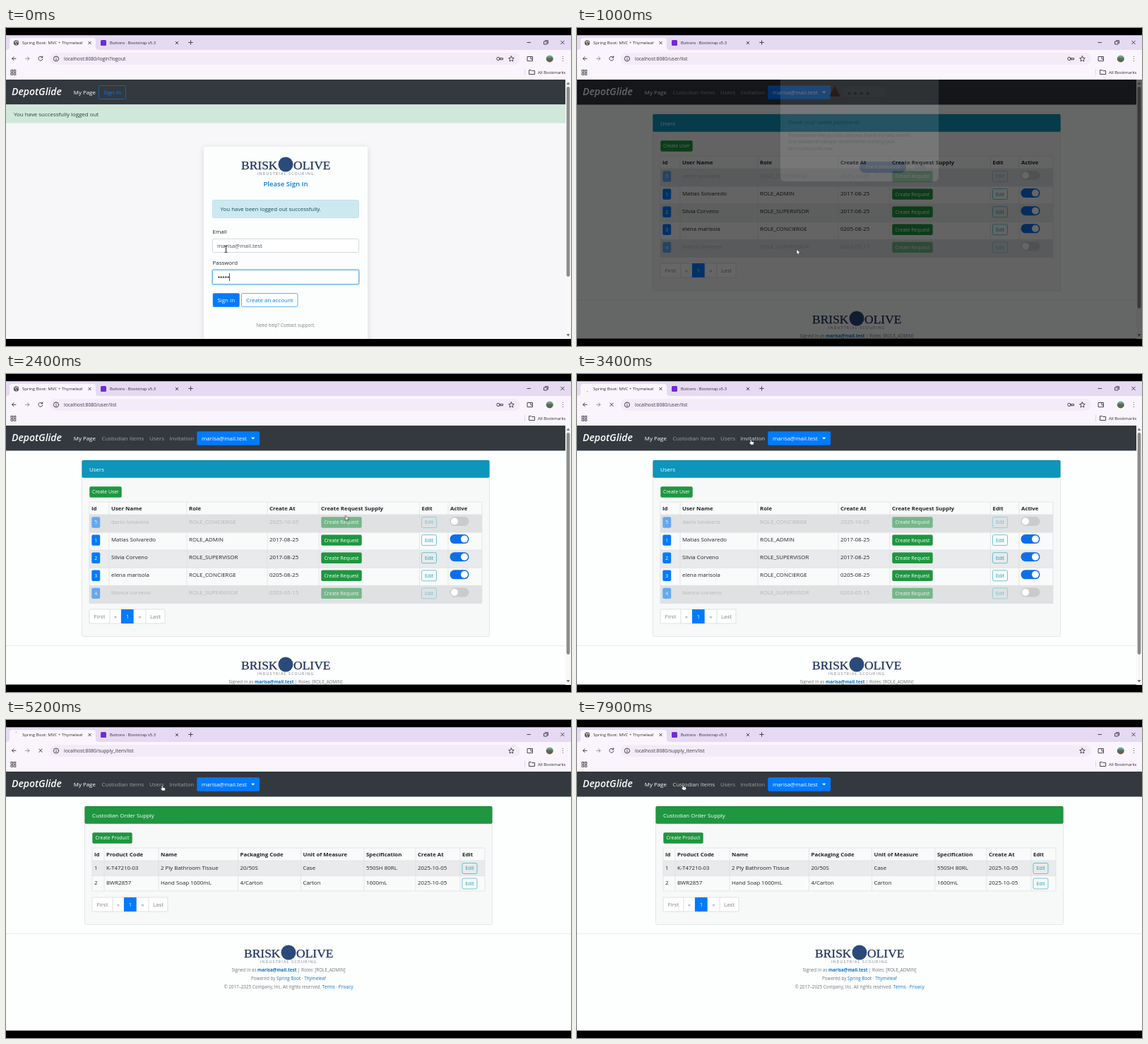
Recreate the animation shown at these times as an HTML page. Size 800 by 450 pixels, loop 8 s.

```html
<!DOCTYPE html>
<html lang="en">
<head>
<meta charset="utf-8">
<title>Supply admin walkthrough</title>
<style>
html, body { margin: 0; width: 100%; height: 100%; overflow: hidden; background: #000; }
svg { display: block; width: 800px; height: 450px; font-family: "Open Sans", "Noto Sans", sans-serif; }
text { white-space: pre; }
.logo { font-family: "Liberation Serif", serif; }
.line { fill: none; stroke: #47434c; stroke-width: 1; stroke-linecap: round; stroke-linejoin: round; }
#wheel { transform-origin: 14.5px 21px; animation: turn .4s linear infinite; }
@keyframes turn { to { transform: rotate(360deg); } }
</style>
</head>
<body>
<svg id="stage" viewBox="0 0 800 450"></svg>
<script>
const LOOP = 8000;
const BLUE = '#007bff', GREEN = '#1f9640', TEAL = '#17a2b8', INK = '#212529', MUTED = '#b4b7ba';
const MAIL = 'marisa@mail.test', OWNER = 'Matias Solvaredo';

// Drawing helpers
const rect = (x, y, w, h, fill, extra = '') =>
  `<rect x="${x}" y="${y}" width="${w}" height="${h}" fill="${fill}" ${extra}/>`;
const text = (x, y, s, size = 7.9, fill = INK, extra = '') =>
  `<text x="${x}" y="${y}" font-size="${size}" fill="${fill}" ${extra}>${s}</text>`;
const middle = (x, y, s, size, fill, extra = '') =>
  text(x, y, s, size, fill, `text-anchor="middle" ${extra}`);
const path = (d, extra = '') => `<path d="${d}" class="line" ${extra}/>`;
const group = (id, ...parts) => `<g id="${id}">${parts.join('')}</g>`;
const cross = (x, y, r) => path(`M${x - r} ${y - r}l${2 * r} ${2 * r}m0 ${-2 * r}l${-2 * r} ${2 * r}`);

const button = (x, y, w, h, label, bg, size = 6.9, fg = '#fff') =>
  rect(x + .3, y + .3, w - .6, h - .6, bg, 'rx="2"') + middle(x + w / 2, y + h / 2 + size * .36, label, size, fg);
const outline = (x, y, w, h, label, color, size = 6.9) =>
  rect(x + .5, y + .5, w - 1, h - 1, 'none', `rx="2" stroke="${color}" stroke-width=".6"`) +
  middle(x + w / 2, y + h / 2 + size * .36, label, size, color);
const fade = (active, s) => active ? s : `<g opacity=".55">${s}</g>`;

// Browser window
function browser() {
  const globe = '<circle cx="14.5" cy="21" r="3.7" fill="#55585c"/>' +
    '<path d="M12 19l2 .4-.5 1.8 1.3 1.2-.6 1.8M15.5 17.8l-.3 1.6 2.2 1" fill="none" stroke="#f4eefa" stroke-width=".9"/>';
  const apps = [0, 4.2].map(dx => [0, 4.2].map(dy =>
    rect(7 + dx, 59.5 + dy, 2.6, 2.6, 'none', 'stroke="#47434c" stroke-width=".9"')).join('')).join('');
  return rect(0, 10, 800, 430, '#fdfefe') +
    rect(0, 10, 800, 22, '#e5daf2') + rect(0, 31, 800, 42, '#faf5fd') +
    '<path d="M1 31q4 0 4-4v-9q0-4 4-4h114q4 0 4 4v9q0 4 4 4z" fill="#faf5fd"/>' +
    group('globe', globe) +
    group('loading', '<path id="wheel" d="M13.8 17.4a3.7 3.7 0 0 1 1.2-.1" fill="none" stroke="#6a6f78"/>') +
    `<g clip-path="url(#tabClip)">${text(23, 23.3, 'Spring Boot: MVC + Thymeleaf', 6.1, '#2b2930')}</g>` +
    cross(118.5, 21, 1.8) +
    rect(134, 17, 8, 8, '#6f2cd6', 'rx="1.5"') +
    text(147, 23.3, 'Buttons · Bootstrap v5.3', 5.8, '#2b2930') + cross(242, 21, 1.8) +
    path('M258.7 20.5h5.6m-2.8-2.8v5.6M738 20.5h4.5M762 19h4v4h-4zM763.5 17.7h4v4') + cross(788, 20.5, 2.3) +
    path('M14 43.3H8.5m2.6-2.6l-2.6 2.6 2.6 2.6') +
    path('M27.5 43.3H33m-2.6-2.6l2.6 2.6-2.6 2.6', 'opacity=".55"') +
    group('reload', path('M51.4 41.5a3 3 0 1 0 .4 2.6M51.8 39.8v2.2h-2.2')) + group('stop', cross(49, 43.3, 2.3)) +
    rect(62, 35, 666, 17, '#f3ecf8', 'rx="8.5"') +
    '<circle cx="71" cy="43.5" r="3.6" class="line"/>' + path('M71 43.3v2M71 41.6v.1') +
    group('key', '<circle cx="697" cy="43.5" r="2.2" class="line"/>', path('M699.2 42.7h4.4v2h-4.2')) +
    path('M715.5 39.8l1.1 2.5 2.7.3-2 1.8.6 2.7-2.4-1.4-2.4 1.4.6-2.7-2-1.8 2.7-.3z') +
    path('M738.5 40.5h7v6.2h-7zM743 41v3h2.5') +
    '<circle cx="769.8" cy="43.5" r="5" fill="url(#avatar)"/>' +
    path('M788.5 40.3v.1m0 3v.1m0 3v.1', 'stroke-width="1.6"') +
    apps + path('M741 59.5h2.6l1 1h4v5H741z') + rect(734, 58, .8, 9, '#d9cfe3') +
    text(753, 64.9, 'All Bookmarks', 5.9, '#2b2930');
}

const url = s => text(82, 46, 'localhost:8080/' + s, 6.85, '#3a373e');

const scrollbar = end => rect(792, 73, 8, 367, '#f8f8f8') + rect(793.6, 83, 4.8, end - 83, '#8c8c8c', 'rx="2.4"') +
  '<path d="M793.5 80l2.5-3.5 2.5 3.5zM793.5 433l2.5 3.5 2.5-3.5z" fill="#777"/>';

function logo(cx, cy) {
  const word = (x, s, anchor) => text(x, cy + 7, s, 17.5, '#1c3058', `class="logo" text-anchor="${anchor}" stroke="#1c3058" stroke-width=".25"`);
  return word(cx - 11.5, 'BRISK', 'end') + `<circle cx="${cx}" cy="${cy}" r="10.5" fill="#2a4a7c"/>` +
    word(cx + 11, 'OLIVE', 'start') +
    middle(cx, cy + 15.3, 'INDUSTRIAL SCOURING', 5.4, '#777c86', 'letter-spacing="1.15"');
}

function footer(cx, y) {
  const link = s => `<tspan fill="#0b74c9">${s}</tspan>`;
  const line = (dy, s) => middle(cx, y + dy, s, 6.3, '#6f757b');
  return rect(0, y, 800, 1, '#e8eaeb') + logo(cx, y + 27) +
    line(53.5, `Signed in as <tspan font-weight="700" fill="#0b74c9">${MAIL}</tspan> | Roles: [ROLE_ADMIN]`) +
    line(65.6, `Powered by ${link('Spring Boot')} · ${link('Thymeleaf')}`) +
    line(77.7, `© 2017–2025 Company, Inc. All rights reserved. ${link('Terms')} · ${link('Privacy')}`);
}

const panel = (x, bottom, title, color) =>
  rect(x + .5, 122.5, 577, bottom - 122.5, '#f7f8f8', 'rx="2" stroke="#dfe1e2" stroke-width=".8"') +
  rect(x + .5, 122, 577, 24.8, color, 'rx="2" stroke="#000" stroke-opacity=".13" stroke-width=".8"') +
  text(x + 11, 137.6, title, 7.9, '#fff');

function pager(x, y) {
  const edges = [0, 29, 45, 63, 80, 107];
  return rect(x, y, 107, 20, '#fff', 'rx="2" stroke="#e3e6e9" stroke-width=".8"') +
    ['First', '«', '1', '»', 'Last'].map((s, i) => {
      const left = x + edges[i], width = edges[i + 1] - edges[i], on = s === '1';
      return rect(left, y, width, 20, on ? BLUE : 'none', on ? '' : 'stroke="#e3e6e9" stroke-width=".8"') +
        middle(left + width / 2, y + 12.9, s, 7.9, on ? '#fff' : '#7b8288');
    }).join('');
}

// Rows are {cells, fill, ink}; empty cells are left for widgets.
function table(cols, top, headHeight, rowHeight, heads, rows) {
  const left = cols[0], width = cols.at(-1) - left, bottom = top + headHeight + rows.length * rowHeight;
  const rule = 'fill="none" stroke="#dee1e4" stroke-width=".8"';
  let out = rect(left, top, width, headHeight, '#f9fafa') +
    heads.map((s, i) => text(cols[i] + 3, top + 12.4, s, 7.85, INK, 'font-weight="700"')).join('');
  rows.forEach(({ cells, fill, ink = INK }, r) => {
    const y = top + headHeight + r * rowHeight;
    out += rect(left, y, width, rowHeight, fill) + `<path d="M${left} ${y}h${width}" ${rule}/>` +
      cells.map((s, i) => text(cols[i] + 3, y + 12.8, s, 7.9, ink)).join('');
  });
  return out + `<path d="M${left} ${top}h${width}M${left} ${bottom}h${width}${cols.map(x => `M${x} ${top}V${bottom}`).join('')}" ${rule}/>`;
}

// Pages
const loginPage = () => rect(0, 108.5, 800, 331.5, '#f7f6f8') + rect(0, 108.5, 792, 26, '#d0e8d9') +
  url('login?logout') + text(11, 124.8, 'You have successfully logged out', 7.9, '#23463a') +
  outline(131, 81, 39, 20, 'Sign In', BLUE, 7.9) +
  rect(280, 168, 232, 280, '#fcfefe', 'rx="3" filter="url(#soft)"') +
  logo(396, 193) + middle(396, 224, 'Please Sign In', 9.6, '#0b78dd', 'font-weight="600"') +
  rect(292.5, 243.5, 207, 25, '#cde9f0', 'rx="2" stroke="#bfe2ea"') +
  text(303.5, 259, 'You have been logged out successfully.', 7.9, '#144f5b') +
  text(292.5, 291, 'Email') + rect(292.5, 298.5, 207, 19, '#fff', 'rx="2" stroke="#d3d8dd"') +
  text(299, 311.2, MAIL, 7.9, '#495057') +
  text(292.5, 335.3, 'Password') +
  rect(292, 342, 208, 21, '#fff', 'rx="2.5" stroke="#b9dcfb" stroke-width="2.4"') +
  rect(292.5, 342.5, 207, 20, '#fff', 'rx="2" stroke="#5aaee8" stroke-width=".9"') +
  [0, 1, 2, 3, 4].map(i => `<circle cx="${301.4 + i * 3.3}" cy="352.6" r="1.2" fill="#333"/>`).join('') +
  rect(316, 347, .8, 11, '#222') +
  button(292.5, 375, 38.5, 20, 'Sign In', BLUE, 7.9) + outline(333, 375, 80.5, 20, 'Create an account', BLUE, 7.9) +
  middle(396, 423.2, 'Need help? Contact support.', 6.3, '#7a7f85') + scrollbar(352);

function usersPage() {
  const cols = [118, 146, 256, 370, 443, 585.5, 626, 674];
  const people = [
    [5, 'dario lunavera', 'CONCIERGE', '2025-10-05', 0],
    [1, OWNER, 'ADMIN', '2017-08-25', 1],
    [2, 'Silvia Corveno', 'SUPERVISOR', '2017-08-25', 1],
    [3, 'elena marisola', 'CONCIERGE', '0205-08-25', 1],
    [4, 'bianca corveno', 'SUPERVISOR', '0203-05-15', 0]];
  const rows = people.map(([, name, role, date, on], i) => ({
    cells: ['', name, 'ROLE_' + role, date], ink: on ? INK : MUTED,
    fill: on ? (i % 2 ? '#f9fafa' : '#e8eaeb') : '#dfe1e3' }));
  const widgets = people.map(([id, , , , on], i) => {
    const y = 202 + i * 25.1;
    return fade(on, button(121, y, 12.5, 16, id, BLUE) + button(446, y, 58, 16, 'Create Request', GREEN) +
      outline(588, y, 22, 16, 'Edit', TEAL)) +
      rect(628.5, y, 27, 13, on ? '#0d6fe8' : '#c9cbcd', 'rx="6.5"') +
      `<circle cx="${on ? 649 : 635}" cy="${y + 6.5}" r="5" fill="#fff"/>`;
  }).join('');
  return url('user/list') + panel(107, 371.5, 'Users', '#0d95bb') +
    button(118, 159, 46, 16, 'Create User', GREEN) +
    table(cols, 181, 18, 25.1, ['Id', 'User Name', 'Role', 'Create At', 'Create Request Supply', 'Edit', 'Active'], rows) +
    widgets + pager(118, 333) + footer(396, 384) + scrollbar(397);
}

function supplyPage() {
  const cols = [122, 139, 216, 328.5, 417.5, 507, 580, 643, 678];
  return url('supply_item/list') + panel(111, 289.5, 'Custodian Order Supply', GREEN) +
    button(122, 159, 57, 16, 'Create Product', GREEN) +
    table(cols, 181, 18, 21.5, ['Id', 'Product Code', 'Name', 'Packaging Code', 'Unit of Measure', 'Specification', 'Create At', 'Edit'], [
      { cells: ['1', 'K-T47210-03', '2 Ply Bathroom Tissue', '20/50S', 'Case', '550SH 80RL', '2025-10-05'], fill: '#e8eaeb' },
      { cells: ['2', 'BWR2857', 'Hand Soap 1600mL', '4/Carton', 'Carton', '1600mL', '2025-10-05'], fill: '#f9fafa' }]) +
    outline(645.5, 202, 22, 16, 'Edit', TEAL) + outline(645.5, 223.5, 22, 16, 'Edit', TEAL) +
    pager(122, 251) + footer(400, 302);
}

function invitePage(count) {
  const cols = [122, 146, 257.5, 335, 469, 589, 678], extra = (count - 2) * 18;
  const codes = [['123', 'true', 'elena Solvaredo'], ['YC8BFUJMWW', 'true', 'dario Solvaredo'], ['TQ4XNRZK7H', 'false', '']];
  const rows = codes.slice(0, count).map(([code, used, by], i) => ({
    cells: [i + 1, code, used, OWNER, by, '2025-10-05'], fill: i % 2 ? '#f9fafa' : '#e8eaeb' }));
  return url('invitation_code/list') + panel(111, 284.5 + extra, 'Invitation Code', GREEN) +
    button(122, 157.5, 105, 20, 'Generate Invitation Code', BLUE, 7.9) +
    table(cols, 183.5, 18, 18, ['Id', 'Code', 'is in used', 'Create by User', 'Is used by', 'Create At'], rows) +
    pager(122, 246.5 + extra) + footer(400, 297 + extra);
}

const navBar = () => rect(0, 73, 800, 35.5, '#33393f') +
  text(8, 95, 'DepotGlide', 14, '#fff', 'font-style="italic" font-weight="600"') + text(95.8, 94.2, 'My Page', 7.9, '#fff');

const navLinks = () => group('links',
  text(135.5, 94.2, 'Custodian Items', 7.9, '#999da0', 'id="navItems"'),
  text(203, 94.2, 'Users', 7.9, '#999da0', 'id="navUsers"'),
  text(231.5, 94.2, 'Invitation', 7.9, '#999da0', 'id="navInvite"'),
  rect(270.3, 81.3, 88.9, 19.4, BLUE, 'rx="2"'), text(277, 94.2, MAIL, 7.9, '#fff'),
  '<path d="M347 89.8h5.4l-2.7 2.8z" fill="#fff"/>');

const dialog = () => group('scrim', rect(0, 73, 800, 367, '#000', 'opacity=".6"')) + group('dialog',
  '<path d="M288 73h224v137q0 7-7 7H295q-7 0-7-7z" fill="#fff"/>', rect(288, 73, 224, 49, '#e9eef8'),
  '<path d="M365 82l8 15h-16z" fill="#c5372c"/>', rect(375, 84, 62, 13, '#fff', 'rx="6.5"'),
  text(382, 95, '∗ ∗ ∗ ∗', 8, '#3c4043'),
  text(298.5, 135.8, 'Check your saved passwords', 7.6, '#1a56b8'),
  text(298.5, 153.5, 'The password that you just used was found in a data breach.', 6.2, '#55585d'),
  text(298.5, 163, 'Your password manager recommends checking your', 6.2, '#55585d'),
  text(298.5, 172.5, 'saved passwords now.', 6.2, '#55585d'),
  rect(400, 189, 66, 16, '#0b57d0', 'rx="8"'), middle(433, 199.3, 'Check passwords', 6.2, '#fff'),
  rect(470.5, 189.5, 32, 15, '#fff', 'rx="7.5" stroke="#a8c0ea"'), middle(486.5, 199.3, 'Close', 6.2, '#0b57d0'));

const pointer = () => group('pointer',
  group('beam', '<path d="M-1.5-4.5H0q.5 0 .5 1v7q0 1-.5 1h-1.5M2.5-4.5H1q-.5 0-.5 1v7q0 1 .5 1h1.5" fill="none" stroke="#222" stroke-width=".9"/>'),
  group('arrow', '<path d="M0 0v7.4l1.7-1.5 1.2 2.6 1.2-.5-1.2-2.6h2.4z" fill="#fff" stroke="#222" stroke-width=".6"/>'),
  group('hand', '<path d="M-.8 1.6q.9-1.2 1.8 0v2.7l3 .7q.9.3.7 1.3l-.6 2.9H0L-2.3 6q-.2-1 .7-.7l.8.8z" fill="#fff" stroke="#222" stroke-width=".7"/>'));

document.getElementById('stage').innerHTML = `<defs>
  <clipPath id="tabClip"><rect x="20" y="12" width="88" height="18"/></clipPath>
  <clipPath id="view"><rect y="10.5" width="800" height="429"/></clipPath>
  <linearGradient id="avatar" x2="0" y2="1"><stop stop-color="#8fb6c9"/><stop offset=".5" stop-color="#4d7350"/><stop offset="1" stop-color="#8a4a45"/></linearGradient>
  <filter id="soft" x="-10%" y="-10%" width="120%" height="120%"><feDropShadow dx="0" dy="2" stdDeviation="4" flood-opacity=".13"/></filter>
  </defs><g clip-path="url(#view)">` + browser() + navBar() +
  group('login', loginPage()) + group('users', usersPage()) + group('supply', supplyPage()) +
  group('invite', invitePage(2)) + group('invited', invitePage(3)) + navLinks() + dialog() + pointer() + '</g>';

// Timelines, in ms
let css = '';
function track(id, prop, stops, timing = 'step-end') {
  const frames = [...stops, [LOOP, stops.at(-1)[1]]].map(([t, v]) => `${t / LOOP * 100}%{${prop}:${v}}`).join('');
  css += `@keyframes ${id}{${frames}}#${id}{animation:${id} ${LOOP}ms ${timing} infinite}`;
}
function during(id, spans, prop = 'opacity', on = 1, off = 0) {
  const stops = spans.flatMap(([from, to]) => [[from, on], [to, off]]).filter(([t]) => t < LOOP);
  track(id, prop, stops[0][0] ? [[0, off], ...stops] : stops);
}

during('login', [[0, 280]]);
during('users', [[280, 3480], [3880, 4860], [5280, 5880]]);
during('supply', [[4860, 5280], [7860, LOOP]]);
during('invite', [[3480, 3880], [5880, 6980]]);
during('invited', [[6980, 7860]]);
during('links', [[280, LOOP]]);
during('key', [[0, 3480]]);

const busy = [[80, 480], [3280, 3480], [3780, 3880], [4680, 4860], [5160, 5280], [6680, 6980], [7780, 7860]];
for (const id of ['loading', 'stop']) during(id, busy);
for (const id of ['globe', 'reload']) during(id, busy, 'opacity', 0, 1);

const hover = (id, spans) => during(id, spans, 'fill', '#d0d3d5', '#999da0');
hover('navInvite', [[2950, 3560], [5780, 5960]]);
hover('navUsers', [[3620, 4140], [5230, 5760]]);
hover('navItems', [[4180, 5040], [7450, LOOP]]);

track('scrim', 'opacity', [[0, 0], [960, 0], [990, 1], [2000, 1], [2180, 0]], 'linear');
track('dialog', 'opacity', [[0, 0], [960, 0], [1000, .12], [1250, 1], [2000, 1], [2150, 0]], 'linear');

during('beam', [[0, 280]]);
during('arrow', [[280, 2950], [5960, 6240], [7160, 7450]]);
during('hand', [[2950, 5960], [6240, 7160], [7450, LOOP]]);
track('pointer', 'transform', [
  [0, 311, 313], [1100, 311, 313], [1750, 485, 197], [2150, 485, 197], [2400, 480, 200], [2700, 646, 255],
  [3000, 246, 91], [3480, 246, 91], [3700, 212, 92], [3900, 212, 92], [4000, 199, 92], [4500, 165, 91],
  [4900, 165, 91], [5200, 221, 91], [5680, 221, 91], [5800, 246, 91], [5920, 246, 91], [6300, 182, 161],
  [7100, 182, 161], [7500, 147, 90], [7600, 150, 90]
].map(([t, x, y]) => [t, `translate(${x}px,${y}px)`]), 'linear');

document.head.appendChild(document.createElement('style')).textContent = css;
</script>
</body>
</html>
```
